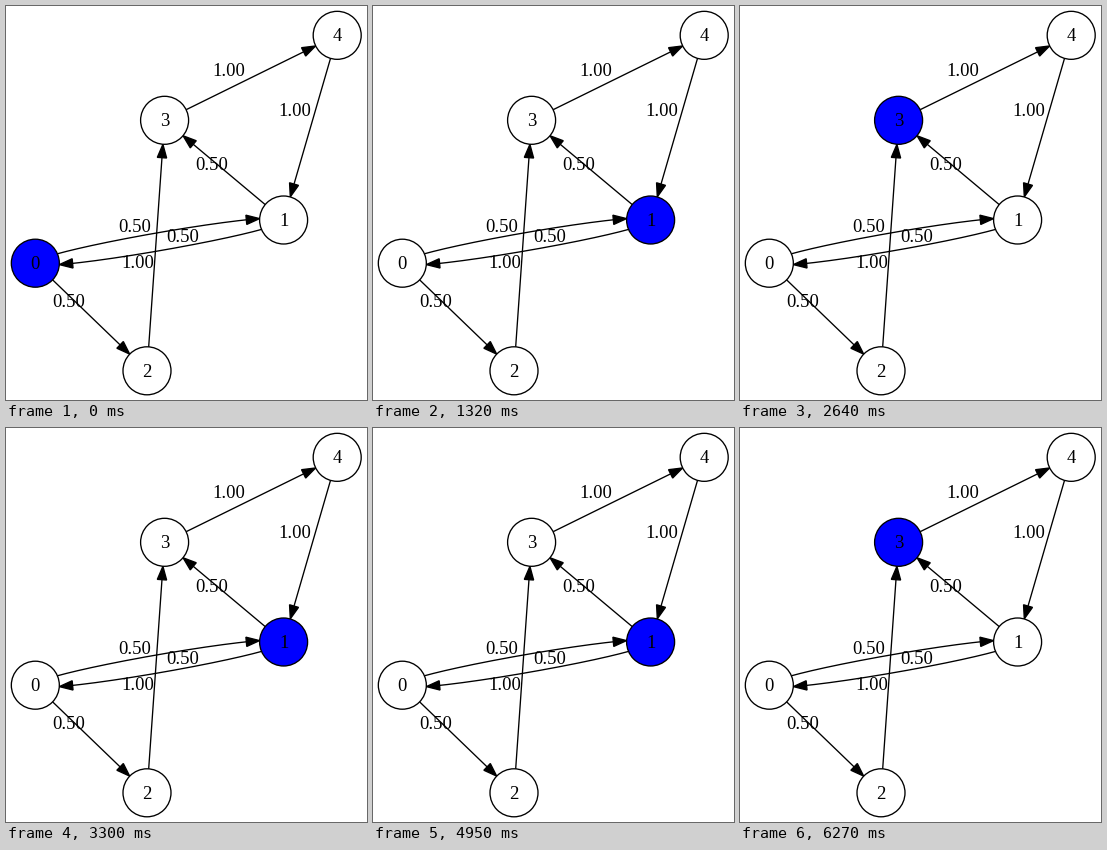
A matplotlib script for the animation above (6.6 s loop, 361x394 px).

```python
import numpy as np
import matplotlib.pyplot as plt
from matplotlib.animation import FuncAnimation
from matplotlib.patches import Circle, Polygon

W, H, DPI = 361, 394, 100
PX = 72 / DPI                    # points per pixel
STROKE = 4 / 3 * PX
FONT = 56 / 3 * PX
RADIUS, ARROW_LEN, ARROW_HALF = 24, 40 / 3, 14 / 3
BOW = 12

NODES = {0: (29.33, 257.2), 1: (277.6, 214.0), 2: (141.0, 364.8),
         3: (158.6, 114.3), 4: (331.2, 29.33)}
# tail, head, label, label centre, bow
EDGES = [(0, 1, "0.50", (129, 220), BOW),
         (1, 0, "0.50", (177, 230), BOW),
         (0, 2, "0.50", (63, 295), 0),
         (1, 3, "0.50", (206, 158), 0),
         (2, 3, "1.00", (132, 256), 0),
         (3, 4, "1.00", (222.5, 64), 0),
         (4, 1, "1.00", (289, 104), 0)]
WALK = [0, 2, 3, 4, 1, 3, 4, 1, 3, 4, 1, 0, 1, 3, 4, 1, 3, 4, 1, 3]

plt.rcParams["font.family"] = "Liberation Serif"
fig = plt.figure(figsize=(W / DPI, H / DPI), dpi=DPI, facecolor="white")
ax = fig.add_axes([0, 0, 1, 1])
ax.set_xlim(0, W)
ax.set_ylim(H, 0)
ax.axis("off")


def label(x, y, text):
    ax.text(x, y + 6, text, size=FONT, color="black", ha="center",
            va="baseline", zorder=4)


def edge_path(tail, head, bow):
    """Points from the tail's rim to the arrow base, and the arrow tip."""
    a, b = np.array(NODES[tail]), np.array(NODES[head])
    along = (b - a) / np.hypot(*(b - a))
    side = np.array([along[1], -along[0]])
    if tail == 1 or tail == 0:
        side = side * 1.0
    t = np.linspace(0, 1, 3000)[:, None]
    c, d = a + bow * side, b + bow * side
    pts = ((1 - t) ** 3 * a + 3 * t * (1 - t) ** 2 * c
           + 3 * t ** 2 * (1 - t) * d + t ** 3 * b)
    outside = ((np.hypot(*(pts - a).T) >= RADIUS)
               & (np.hypot(*(pts - b).T) >= RADIUS))
    pts = pts[outside]
    tip = pts[-1]
    return pts[np.hypot(*(pts - tip).T) >= ARROW_LEN], tip


def draw_edge(tail, head, text, pos, bow):
    pts, tip = edge_path(tail, head, bow)
    ax.plot(*pts.T, color="black", lw=STROKE, solid_capstyle="butt",
            snap=False, zorder=3)
    base = pts[-1]
    u = (tip - base) / np.hypot(*(tip - base))
    wing = ARROW_HALF * np.array([-u[1], u[0]])
    ax.add_patch(Polygon([base + wing, tip, base - wing], fc="black",
                         ec="black", lw=STROKE, joinstyle="miter",
                         snap=False, zorder=3))
    label(*pos, text)


discs = {}
for name, centre in NODES.items():
    discs[name] = ax.add_patch(Circle(centre, RADIUS, fc="white", ec="black",
                                      lw=STROKE, snap=False, zorder=2))
    label(*centre, str(name))
for edge in EDGES:
    draw_edge(*edge)


def update(i):
    for name, disc in discs.items():
        disc.set_facecolor("blue" if name == WALK[i] else "white")
    return list(discs.values())


anim = FuncAnimation(fig, update, frames=len(WALK), interval=330,
                     repeat=True, repeat_delay=0, blit=False)
plt.show()
```
